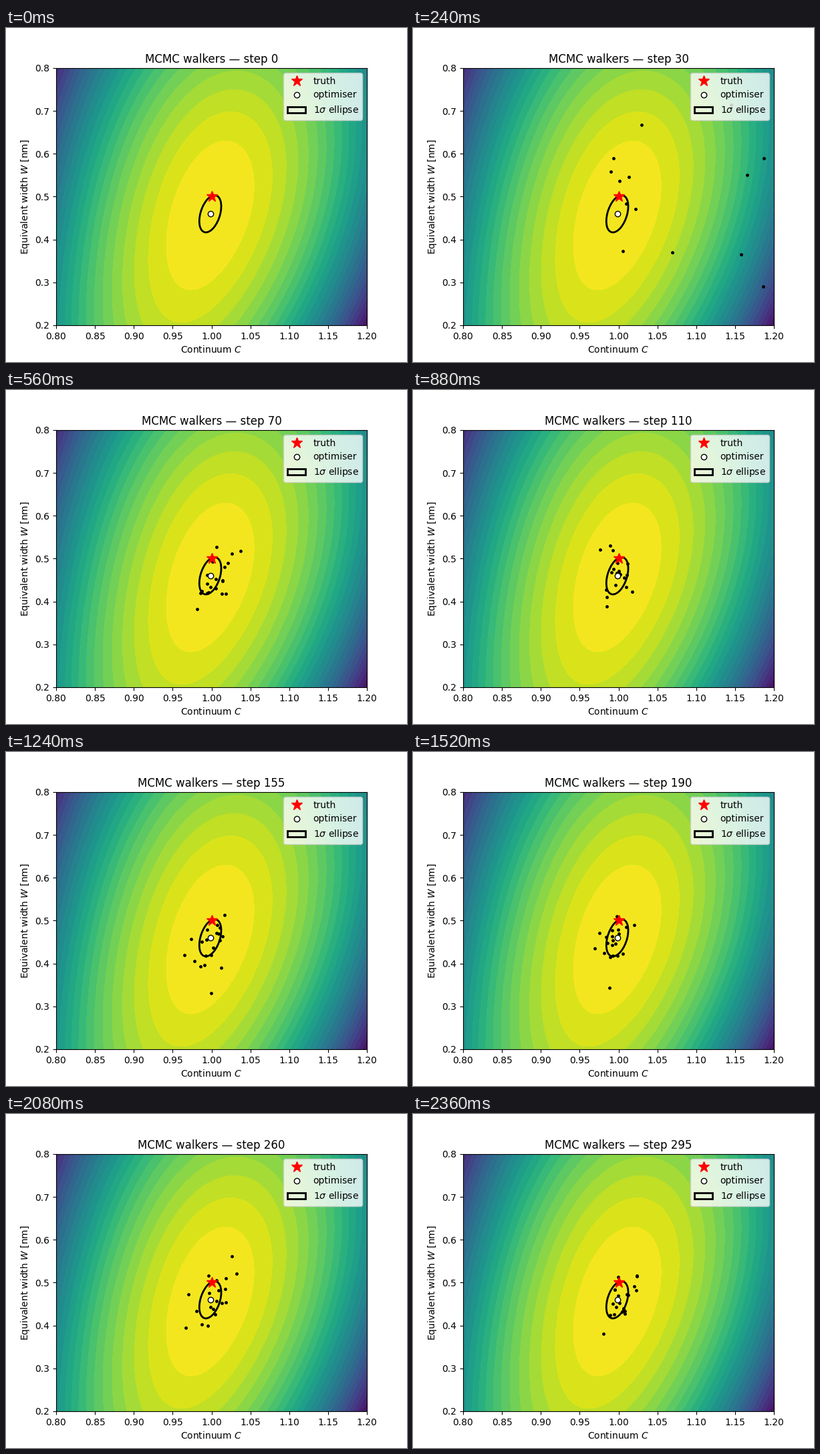
Animation, 600 px wide and 500 px high, one loop 2400 ms. Source, as a matplotlib script:

```python
import numpy as np
import matplotlib.pyplot as plt
from matplotlib.animation import FuncAnimation
from matplotlib.patches import Ellipse

FRAMES, INTERVAL, STRIDE = 60, 40, 5
WALKERS = 20

# Posterior: best fit, 1-sigma widths and correlation of (C, W)
C0, W0 = 0.9984, 0.4600
SC, SW, RHO = 0.0141, 0.0433, 0.40
COV = np.array([[SC**2, RHO * SC * SW], [RHO * SC * SW, SW**2]])
JAC = np.array([[1, 0], [W0, C0]])
PREC = np.linalg.inv(JAC @ COV @ JAC.T)
LEVELS = np.arange(-208, 1, 8)

rng = np.random.default_rng(7)


def log_like(c, w):
    """Line model C * (1 - W * phi): quadratic in C and C * W."""
    a, b = c - C0, c * w - C0 * W0
    return -0.5 * (PREC[0, 0] * a**2 + 2 * PREC[0, 1] * a * b + PREC[1, 1] * b**2)


def far_start():
    """Walkers spread out to the right of the visible range."""
    return np.column_stack([1 + rng.uniform(0.25, 1.1, WALKERS),
                            0.5 + rng.uniform(-1, 1, WALKERS)])


def stretch(pos):
    """One affine-invariant stretch move of both halves."""
    pos = pos.copy()
    half = WALKERS // 2
    first, second = np.arange(half), np.arange(half, WALKERS)
    for move, other in ((first, second), (second, first)):
        z = (1 + rng.random(half))**2 / 2
        partner = pos[rng.choice(other, half)]
        trial = partner + z[:, None] * (pos[move] - partner)
        gain = np.log(z) + log_like(*trial.T) - log_like(*pos[move].T)
        ok = np.log(rng.random(half)) < gain
        pos[move[ok]] = trial[ok]
    return pos


chain = [far_start()]
for _ in range(1, FRAMES * STRIDE):
    chain.append(stretch(chain[-1]))

fig, ax = plt.subplots(figsize=(6, 5), dpi=100)

c, w = np.meshgrid(np.linspace(0.8, 1.2, 200), np.linspace(0.2, 0.8, 200))
ax.contourf(c, w, log_like(c, w), levels=LEVELS,
            cmap="viridis", vmin=LEVELS[0], vmax=LEVELS[-1])

dots, = ax.plot([], [], "k.", ms=5, zorder=2)
ax.plot(1.0, 0.5, "r*", ms=12, ls="none", label="truth", zorder=3)
ax.plot(C0, W0, "o", ms=6, mfc="white", mec="black", ls="none",
        label="optimiser", zorder=3)

val, vec = np.linalg.eigh(COV)
width, height = 2 * np.sqrt(val[::-1])
angle = np.degrees(np.arctan2(vec[1, 1], vec[0, 1]))
ax.add_patch(Ellipse((C0, W0), width, height, angle=angle, fill=False,
                     ec="black", lw=2, zorder=1.5, label=r"1$\sigma$ ellipse"))

ax.set_xlim(0.8, 1.2)
ax.set_ylim(0.2, 0.8)
ax.set_xlabel("Continuum $C$")
ax.set_ylabel("Equivalent width $W$ [nm]")
ax.legend(loc="upper right")
title = ax.set_title("")


def draw(frame):
    step = frame * STRIDE
    dots.set_data(*chain[step].T)
    title.set_text(f"MCMC walkers \u2014 step {step}")
    return dots, title


anim = FuncAnimation(fig, draw, frames=FRAMES, interval=INTERVAL,
                     repeat=True, repeat_delay=0, blit=False)
plt.show()
```
